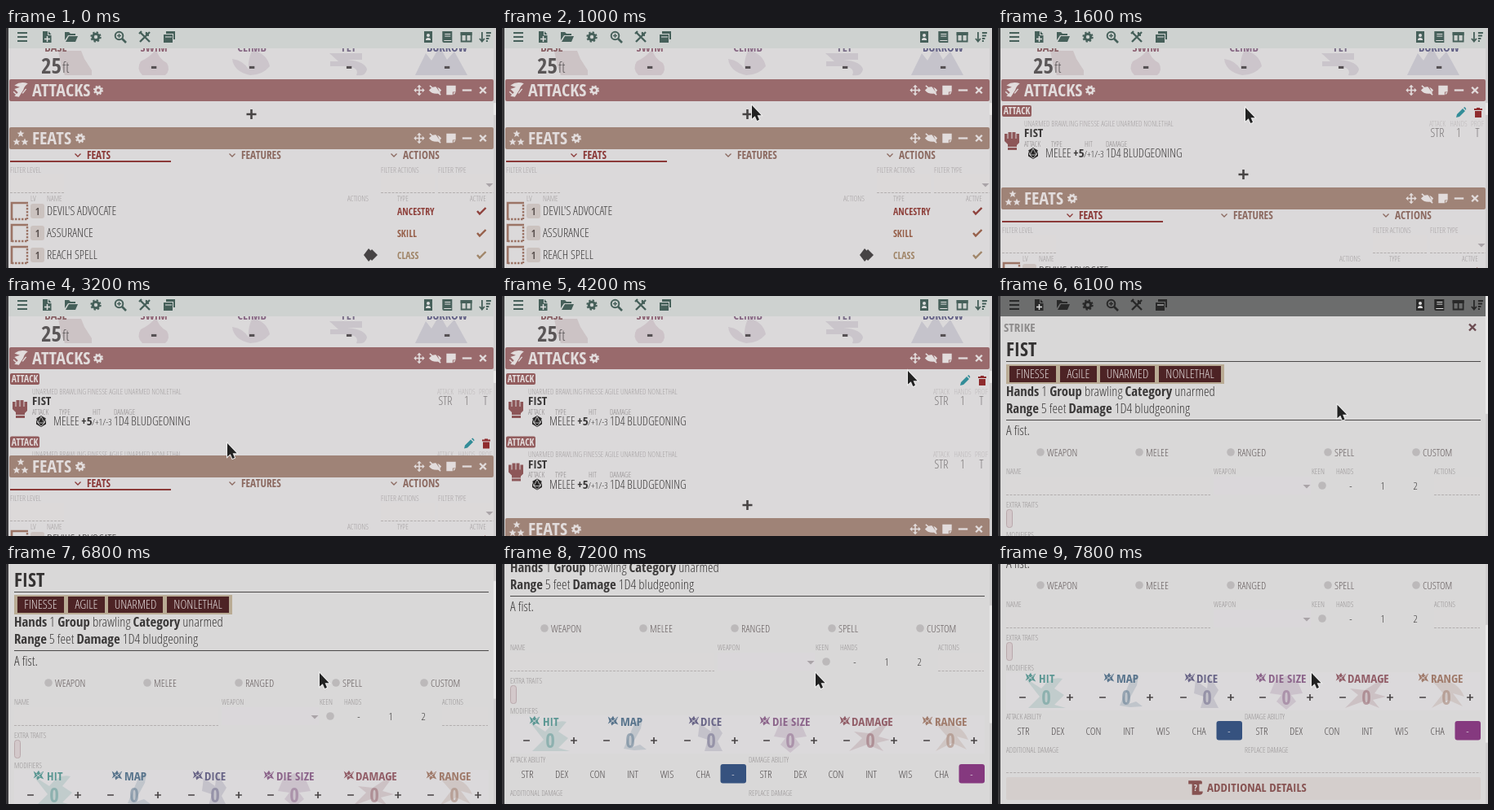
An HTML page for the animation above (8 s loop, 600 by 295 pixels).

```html
<!DOCTYPE html>
<html lang="en">
<head>
<meta charset="utf-8">
<title>Character sheet</title>
<style>
html, body { margin: 0; width: 100%; height: 100%; overflow: hidden; background: #dbd9da; }
svg { display: block; width: 600px; height: 295px; }
text { font-family: "Open Sans", "Noto Sans", sans-serif; font-stretch: 75%; font-weight: 300; fill: currentColor; white-space: pre; }
.bold { font-family: "Open Sans Condensed", "Open Sans", sans-serif; font-weight: 700; }
/* without a condensed bold, thicken the condensed light */
.thicken .bold { font-family: "Open Sans", sans-serif; font-weight: 300; stroke: currentColor; stroke-width: .065em; letter-spacing: .045em; }
</style>
</head>
<body>
<svg id="stage" viewBox="0 0 600 295"></svg>
<script>
const INK = '#3b3939', PALE = '#a5a1a2';
const stage = document.getElementById('stage');

const pen = document.createElement('canvas').getContext('2d');
const boldWidth = families => {
  pen.font = `700 100px ${families}`;
  return pen.measureText('FEATS').width;
};
if (boldWidth('"Open Sans Condensed", "Open Sans"') > boldWidth('"Open Sans"') * .9) stage.classList.add('thicken');

// Text is placed by the middle of its capitals.
const text = (x, y, s, size, weight = 300, color = INK, anchor = 'start') =>
  `<text x="${x}" y="${y + size * .357}" font-size="${size}" class="${weight > 500 ? 'bold' : ''}" color="${color}" text-anchor="${anchor}">${s}</text>`;
const mid = (x, y, s, size, weight, color) => text(x, y, s, size, weight, color, 'middle');
const label = (x, y, s, color = PALE) => text(x, y, s, 9.3, 300, color);
const rect = (x, y, w, h, fill, r = 0, extra = '') =>
  `<rect x="${x}" y="${y}" width="${w}" height="${h}" fill="${fill}" rx="${r}" ${extra}/>`;
const dot = (x, y, r, fill) => `<circle cx="${x}" cy="${y}" r="${r}" fill="${fill}"/>`;
const path = d => `<path d="${d}"/>`;
const line = (d, w = 2) => `<path d="${d}" fill="none" stroke="currentColor" stroke-width="${w}"/>`;
const dashes = (x1, x2, y) =>
  `<path d="M${x1} ${y}H${x2}" stroke="#b3afaf" stroke-dasharray="3 1.5"/>`;
const caret = (x, y) => `<path d="M${x - 4.5} ${y - 2}h9l-4.5 4.5z" fill="#aaa4a8"/>`;

const icons = {
  menu: line('M-6-5H6M-6 0H6M-6 5H6'),
  file: path('M-5-7H1V-2H5.5V7H-5zM2-7L5.5-3H2z') + '<path d="M-3 2.5H4M.5-1V6" stroke="#ddd" stroke-width="1.5"/>',
  folder: path('M-8-6H-3L-1-4H5V-2H-4L-8 4zM-3-1H8L5 6H-7z'),
  gear: '<g fill="none" stroke="currentColor"><circle r="3.7" stroke-width="3"/><circle r="5.6" stroke-width="2.2" stroke-dasharray="2.2"/></g>',
  zoom: '<circle cx="-1.5" cy="-1.5" r="4.8" fill="none" stroke="currentColor" stroke-width="2"/>' + line('M2 2L7 7', 2.6) + line('M-4-1.5H1M-1.5-4V1', 1.4),
  tools: line('M-6-6L6 6M-6 6L6-6', 2.4) + line('M2-6Q1-2 5-2M-7-4L-4-7', 2.2),
  windows: path('M-4-7H7V3H5V-4H-4zM-7-3H4V7H-7z') + '<path d="M-5 0H3" stroke="#ddd"/>',
  contact: path('M-5-7H5V7H-5z') + '<g fill="#ddd"><circle cy="-2" r="2"/><path d="M-3 4Q-3 1 0 1T3 4z"/></g>',
  book: path('M-6-7H6V7H-4Q-6 7-6 5z') + '<path d="M-3-3.5H4M-3-1H4M-4 4.5H5" stroke="#ddd" stroke-width="1.2"/>',
  columns: line('M-6-5H6V5.5H-6zM0-5V5M-6-5H6', 1.8) + path('M-7-6H7V-2H-7z'),
  sort: line('M-4-6V5M-7 2L-4 5.5L-1 2M1 5H3M1 2H4.5M1-1.5H6M1-5H7', 1.8),
  move: line('M-5 0H5M0-5V5', 1.7) + path('M0-7L3-4H-3zM0 7L3 4H-3zM-7 0L-4-3V3zM7 0L4-3V3z'),
  hide: path('M-8 0Q-4-5 1-4.5L7 4Q-4 6-8 0zM3-4Q6-3 8 0L6 2.5z') + line('M-7-6L7 6', 1.6),
  note: path('M-6-6H6V2H2V6H-6zM3 6V3H6z'),
  minus: line('M-6 0H6', 2.4),
  close: line('M-4-4L4 4M-4 4L4-4', 2.4),
  plus: line('M-6 0H6M0-6V6', 2.6),
  chevron: line('M-3.5-1.5L0 2L3.5-1.5', 1.3),
  check: line('M-5 0L-2 3.5L5.5-4', 2.4),
  star: path('M0-5L1.4-1.6L5-1.5L2.2.8L3.2 4.5L0 2.4L-3.2 4.5L-2.2.8L-5-1.5L-1.4-1.6z'),
  blade: path('M-7-5Q0-10 8-7Q4-4 3 0L-2 8L-7 7L-3 3L-7-1L-1-3z') + line('M-8 2L-4 6M2 4L6-1', 1.3),
  fist: path('M-9-8h3.5v6h1v-8h4v8h1v-8h4v8h1v-6H9V3L6 6V8H-5V5L-9 1z') + path('M-5 9H6V12H-5z'),
  die: path('M0-7L6-3.5V3.5L0 7L-6 3.5V-3.5z') + '<path d="M0-6L-4 2H4zM-4 2L0 6L4 2M-6-3.5L-4 2M6-3.5L4 2" fill="none" stroke="#ddd" stroke-width=".8"/>',
  pencil: path('M-6 6L-5 2L2-5L5-2L-2 5zM3-6L4.5-7Q7-5 6-3z'),
  trash: path('M-5-5H-2V-6H2V-5H5V-3H-5zM-4-2H4V6H-4z'),
  diamond: path('M-3-8L0-5L-5 0L0 5L-3 8L-9 0zM1-7L8 0L1 7L-5 0z'),
  spark: path('M-7-6L-3-3L0-7L2-3L7-6L4 0L7 5L2 3L-2 6L-3 2L-7 4L-5 0z') + '<path d="M-6 4L5-4M-3-2L2 2" stroke="#dcdadc"/>',
  scroll: path('M-8-8H5Q8-8 7-4H4V4H8Q8 8 4 8H-4V-4H-8z') + '<text x="-2" y="4" font-size="10" class="bold" color="#ddd">?</text>'
};
const icon = (name, x, y, color, k = 1) =>
  `<g transform="translate(${x} ${y}) scale(${k})" color="${color}" fill="currentColor">${icons[name]}</g>`;

const toolbar = (bg, color) => rect(3, 0, 597, 25, bg) +
  ['menu', 'file', 'folder', 'gear', 'zoom', 'tools', 'windows'].map((n, i) => icon(n, 20 + i * 30, 11, color)).join('') +
  ['contact', 'book', 'columns', 'sort'].map((n, i) => icon(n, 517 + i * 23.3, 11, color)).join('');

const header = (y, name, fill, gearX) => rect(4, y, 593, 27, fill, 2) +
  text(32, y + 13.5, name, 22, 700, '#e2dcdc') + icon('gear', gearX, y + 13.5, '#e2dcdc', .9) +
  ['move', 'hide', 'note', 'minus', 'close'].map((n, i) => icon(n, 506 + i * 19.5, y + 13.5, '#e2dcdc', .95)).join('');

function speeds() {
  const marks = [
    ['BASE', 61, '#875f63', 'M64 28h28l4 10 9 14v6H72l-4-10z'],
    ['SWIM', 181, '#8d6273', 'M184 26q2 11 13 17 5 9-2 15h-28q-8-8-2-17 11-5 19-15z'],
    ['CLIMB', 301, '#876884', 'M302 27q18 5 21 20-9 11-24 11-20-4-22-20 14 2 20 13-1-14 5-24z'],
    ['FLY', 420, '#786c86', 'M396 31h40v8h-18q22 2 24 12-2 9-13 7 4-9-10-11h-22v-6h10z'],
    ['BURROW', 540, '#626085', 'M501 58l13-27 7 9 10-17 9 16 9-10 16 29z']
  ];
  return marks.map(([s, x, c, d], i) => `<path d="${d}" fill="${c}" opacity=".18"/>` + mid(x, 24, s, 14.5, 700, c) +
    (i ? mid(x, 47, '-', 26, 700, '#565154') : '')).join('') +
    text(43, 46.5, '25', 27, 700, '#5a5657') + text(69, 48, 'ft', 19, 300, '#5a5657');
}

const card = (id, y) => `<g id="${id}" transform="translate(0 ${y})">` +
  rect(5, 95, 36, 14, '#925c5d', 2) + mid(23, 102, 'ATTACK', 11.5, 700, '#e5dede') +
  label(32, 117.5, 'UNARMED BRAWLING FINESSE AGILE UNARMED NONLETHAL') +
  text(32, 129, 'FIST', 15, 700) + icon('fist', 17, 138, '#8d5658', 1) +
  [[32, 'ATTACK'], [65, 'TYPE'], [106, 'HIT'], [132, 'DAMAGE']].map(([x, s]) => label(x, 142.5, s, '#8f8b8c')).join('') +
  icon('die', 43, 154, '#282626') + text(58, 154, 'MELEE', 14.5) + text(92, 154, '+5', 15, 700) +
  text(105, 155, '/+1/-3', 11.5) + text(132, 154, '1D4 BLUDGEONING', 14.5) +
  [[538, 'ATTACK', 'STR'], [564, 'HANDS', '1'], [587, 'PROF', 'T']].map(([x, s, v]) =>
    mid(x, 117.5, s, 9.3, 300, '#bdb9ba') + mid(x, 129, v, 14.5, 300, '#777374')).join('') +
  `<g class="edit">${icon('pencil', 567, 104, '#338d98')}${icon('trash', 588, 104, '#8f2c2e')}</g></g>`;

function featRow(i, name, type, color) {
  const y = 225 + i * 27;
  return `<g stroke="#9b7466" fill="none"><path d="M7 ${y + 11}V${y - 10}H27" stroke-width="2.6"/>` +
    `<path d="M7 ${y + 10}H27M26 ${y - 8}V${y + 10}" stroke-width="2.4" stroke-dasharray="2.5 1.5"/></g>` +
    rect(30, y - 9, 17, 18, '#cbc2bf', 3) + mid(38.5, y + .5, '1', 12, 700, '#5c5350') +
    text(50, y, name, 14.8) + text(479, y + .5, type, 11.8, 700, color) + icon('check', 582, y, color);
}

function feats() {
  const tabs = [[88, 'FEATS', '#8b3a39'], [277, 'FEATURES', '#8c6a61'], [475, 'ACTIONS', '#8c6a61']];
  const labels = [[5, 174.5, 'FILTER LEVEL'], [459, 174.5, 'FILTER ACTIONS'], [529, 174.5, 'FILTER TYPE'],
    [30, 210, 'LV'], [50, 210, 'NAME'], [418, 210, 'ACTIONS'], [479, 210, 'TYPE'], [568, 210, 'ACTIVE']];
  const rows = [["DEVIL'S ADVOCATE", 'ANCESTRY', '#8e403b'], ['ASSURANCE', 'SKILL', '#965f49'], ['REACH SPELL', 'CLASS', '#a08568']];
  return '<g id="feats">' + rect(3, 122, 594, 180, '#dbd9da') + header(122, 'FEATS', '#9f8377', 91) +
    icon('star', 18, 130, '#e2dcdc', .9) + icon('star', 13, 140, '#e2dcdc', .9) + icon('star', 23, 140, '#e2dcdc', .9) +
    tabs.map(([x, s, c]) => icon('chevron', x, 156, c) + text(x + 11, 156.5, s, 13.3, 700, c)).join('') +
    rect(5, 163, 197, 2, '#8b3a39') + labels.map(l => label(...l)).join('') +
    [[5, 71], [459, 525], [529, 597]].map(([a, b]) => rect(a, 180, b - a, 22, '#dcd9d9') + dashes(a, b, 202.5)).join('') +
    caret(592, 193) + rows.map((r, i) => featRow(i, ...r)).join('') + icon('diamond', 447, 279, '#464344') + '</g>';
}

function modifier([name, x, iconX, nameX, color, shape]) {
  return `<path transform="translate(${x} 325)" d="${shape}" fill="${color}" opacity=".2"/>` +
    icon('spark', iconX, 306, color, .9) + text(nameX, 307, name, 15, 700, color) +
    `<g opacity=".5">${mid(x, 330, '0', 25, 700, color)}</g>` +
    icon('minus', x - 29, 330, '#4a4647', .65) + icon('plus', x + 29, 330, '#4a4647', .65);
}

function dialog() {
  const tags = [[14, 57, 'FINESSE'], [76, 45, 'AGILE'], [125, 67, 'UNARMED'], [197, 76, 'NONLETHAL']];
  const kinds = [[52, 'WEAPON'], [173, 'MELEE'], [285, 'RANGED'], [404, 'SPELL'], [512, 'CUSTOM']];
  const labels = [[10, 216, 'NAME'], [264, 216, 'WEAPON'], [384, 216, 'KEEN'], [414, 216, 'HANDS'], [534, 216, 'ACTIONS'],
    [10, 257, 'EXTRA TRAITS'], [10, 294, 'MODIFIERS'], [10, 354, 'ATTACK ABILITY'], [302, 354, 'DAMAGE ABILITY'],
    [10, 395, 'ADDITIONAL DAMAGE'], [302, 395, 'REPLACE DAMAGE']];
  const blades = 'M-8 15L6-18 15-22 13-10 0 14 12 10 20 16 5 17z';
  const mods = [
    ['HIT', 59, 40, 50, '#5b9793', 'M-26-19L-6-6Q6-22 20-18L10-6 22 2 10 14 24 18H-22L-8 4z'],
    ['MAP', 157, 136, 145, '#58748c', blades],
    ['DICE', 256, 235, 243, '#696587', 'M-14-16L0-6 2-22 14-4 8 6 14 18H-8L-4 4-16 0z'],
    ['DIE SIZE', 353, 322, 331, '#8c658b', 'M0-22L14-14 20 0 6 2 12 10 0 20-12 10-6 2-20 0-14-14z'],
    ['DAMAGE', 451, 420, 428, '#925e68', 'M26-22L10 0 24 4 8 8 16 18-4 10-26 18-10 2-20-6-2-4z'],
    ['RANGE', 549, 521, 530, '#a07b6b', 'M-18-16Q12-20 22 4L8 0 20 16 2 8-18 18-4 0z']
  ];
  const stats = ['STR', 'DEX', 'CON', 'INT', 'WIS', 'CHA'], at = [31, 73, 117, 160, 202, 246];
  const b = s => `<tspan class="bold">${s}</tspan>`;
  return '<g id="dialog"><g id="sheet">' + toolbar('#6c6d6d', '#292929') +
    '<path d="M3 500V31Q3 25 9 25H591Q597 25 597 31V500z" fill="#d9d8d8"/>' +
    text(7, 39, 'STRIKE', 15, 700, '#8d8b8b') + icon('close', 581, 38.5, '#6a4a50') +
    text(10, 65, 'FIST', 24, 700, '#343232') + rect(10, 80, 581, 1, '#4a4848') +
    rect(10, 84, 267, 24, '#b9ab94') +
    tags.map(([x, w, s]) => rect(x, 86, w, 20, '#4d2325') + mid(x + w / 2, 96, s, 15.2, 300, '#e4dcdc')).join('') +
    text(10, 117, `${b('Hands')} 1 ${b('Group')} brawling ${b('Category')} unarmed`, 16.7) +
    text(10, 138, `${b('Range')} 5 feet ${b('Damage')} 1D4 bludgeoning`, 16.7) +
    rect(10, 152, 581, 1, '#4a4848') + text(10, 165, 'A fist.', 16.7) +
    kinds.map(([x, s]) => dot(x, 192, 4.8, '#bcb9ba') + text(x + 8, 192, s, 12.8, 300, '#665d5e')).join('') +
    rect(10, 222, 250, 22, '#dad8d8') + rect(264, 222, 119, 22, '#dad7da') + rect(534, 222, 56, 22, '#dad8d8') +
    labels.map(l => label(...l, '#989495')).join('') + dashes(10, 260, 244.5) + dashes(534, 590, 244.5) +
    caret(378, 234) + dot(397, 233, 4.8, '#bcb9ba') +
    mid(432, 233, '-', 13) + mid(471, 233, '1', 13) + mid(511, 233, '2', 13) +
    rect(10.5, 262.5, 7, 22, '#d3c8ca', 3, 'stroke="#b9a8ab"') +
    rect(10, 299, 581, 47, '#dbd9db') + mods.map(modifier).join('') +
    [[0, '#36527f'], [292, '#85397f']].map(([dx, c]) =>
      stats.map((s, i) => mid(at[i] + dx, 371, s, 13, 300, '#504b4c')).join('') +
      rect(267.5 + dx, 359, 31.5, 23.5, c, 3) + mid(283 + dx, 371, '-', 13, 300, '#e4e0e4') +
      dashes(10 + dx, 298.5 + dx, 422.5)).join('') +
    rect(10, 428, 581, 28, '#d4cecc', 2) + icon('scroll', 242, 441, '#875352', 1.1) +
    text(256, 441, 'ADDITIONAL DETAILS', 15, 700, '#875352') + '</g></g>';
}

stage.innerHTML = rect(0, 0, 600, 295, '#dbd9da') + speeds() + toolbar('#ced2d0', '#46605a') +
  header(63, 'ATTACKS', '#996a6c', 113) + icon('blade', 18, 76, '#e2dcdc', 1.1) +
  card('one', 0) + card('two', 77.5) + `<g id="add">${icon('plus', 300.5, 106, '#474444')}</g>` + feats() + dialog() +
  rect(597, 0, 3, 295, '#d0cecf') + rect(597, 0, 3, 145, '#e9e8e8', 1, 'id="thumb"') + rect(0, 0, 3, 295, '#39383b') +
  '<path id="cursor" d="M0 0V16.5L3.8 13.2L6.3 19L9 17.8L6.6 12.2H11.6z" fill="#222" stroke="#eee" stroke-width="2" paint-order="stroke"/>';

const el = Object.fromEntries(['one', 'two', 'add', 'feats', 'dialog', 'sheet', 'thumb', 'cursor']
  .map(id => [id, document.getElementById(id)]));
const edits = ['one', 'two'].map(id => el[id].querySelector('.edit'));
const show = (node, on) => node.setAttribute('visibility', on ? 'inherit' : 'hidden');
const move = (node, x, y) => node.setAttribute('transform', `translate(${x} ${y})`);

// start, end, ease-out power, then a curve: from, control, to
const strokes = [
  [700, 1100, 1.3, 322, 69, 312, 90, 303, 98],
  [2000, 2700, 1.2, 303, 98, 22, 140, 271, 181],
  [3600, 4200, 1.2, 271, 181, 145, 145, 497, 92],
  [4500, 4900, 1.3, 497, 92, 540, 92, 576, 98],
  [5200, 5300, 1, 576, 98, 568, 98, 559, 98],
  [6000, 6400, 2.1, 559, 98, 342, 155, 384, 134]
];
const scrolls = [[6500, 6900, 1.5, 0, 53], [7000, 7500, 1.63, 53, 159], [7600, 7800, 1.5, 159, 166]];
const ease = (t, [a, b, k]) => 1 - (1 - Math.min(1, Math.max(0, (t - a) / (b - a)))) ** k;
const current = (list, t) => list.filter(s => t >= s[0]).pop() || list[0];

function pointer(t) {
  const s = current(strokes, t), u = ease(t, s), v = 1 - u;
  return [3, 4].map(i => v * v * s[i] + 2 * u * v * s[i + 2] + u * u * s[i + 4]);
}

function draw(time) {
  const t = Math.floor(time % 8000 / 100) * 100; // the screen updates every 100 ms
  const [x, y] = pointer(t);
  const drop = t < 1600 ? 0 : t < 3500 ? 74 : 151;
  const open = t >= 5500;
  const s = current(scrolls, t), scroll = Math.round(s[3] + (s[4] - s[3]) * ease(t, s));
  show(el.one, t >= 1500);
  show(el.two, t >= 3100);
  show(edits[0], t >= 1500 && y < 166);
  show(edits[1], t >= 3100 && y >= 166);
  show(el.add, !(t === 1500 || t >= 3100 && t < 3500));
  move(el.add, 0, drop);
  move(el.feats, 0, drop);
  show(el.dialog, open);
  move(el.sheet, 0, -scroll);
  el.thumb.setAttribute('y', open ? scroll * .45 : 92);
  el.thumb.setAttribute('height', open ? 145 : 15);
  show(el.cursor, t >= 600);
  move(el.cursor, x, y);
}

function tick(now) {
  draw(now);
  requestAnimationFrame(tick);
}
draw(0);
requestAnimationFrame(tick);
</script>
</body>
</html>
```
